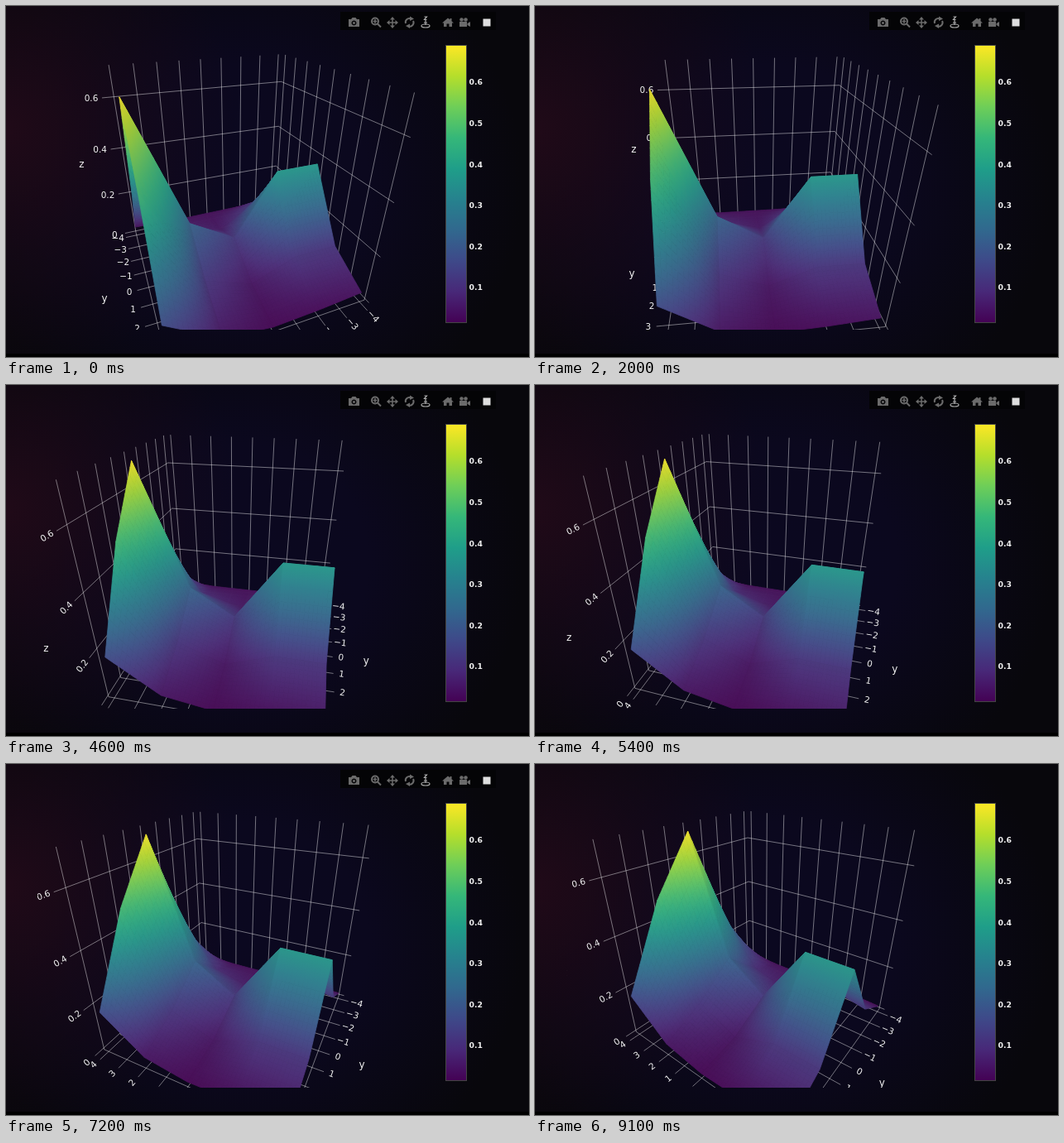
An HTML page with a canvas that plays this animation: 632 px wide and 424 px high, repeating every 9.2 s.

```html
<!DOCTYPE html>
<html lang="en">
<head>
<meta charset="utf-8">
<title>Rotating surface plot</title>
<style>
  html, body { margin: 0; width: 100%; height: 100%; overflow: hidden; background: #08070c; }
  #stage {
    position: relative; width: 632px; height: 424px; overflow: hidden;
    background:
      linear-gradient(#0000 420px, #000 420px),
      radial-gradient(ellipse 280px 300px at 0 150px, #200a18 0, #1c091880 50%, #1c091800 100%),
      radial-gradient(ellipse 340px 320px at 285px 215px, #0b0820 0, #0b081e 45%, #08070c 100%);
  }
  canvas, svg { position: absolute; left: 0; top: 0; }
  #bar { animation: hide 9200ms step-end infinite; }
  @keyframes hide { 0% { opacity: 1 } 94.5% { opacity: 0 } 100% { opacity: 0 } }
  .scale text { font: bold 9.3px "DejaVu Sans", sans-serif; fill: #f0f0f0; }
</style>
</head>
<body>
<div id="stage">
  <canvas id="plot" width="632" height="424"></canvas>
  <svg width="632" height="424">
    <defs><linearGradient id="ramp" x1="0" y1="1" x2="0" y2="0"></linearGradient></defs>
    <g class="scale" id="scale">
      <rect x="531.5" y="47.5" width="25" height="335" fill="url(#ramp)" stroke="#444"/>
    </g>
    <g id="bar" fill="#6b6b6b" stroke="none">
      <rect x="404" y="7" width="188" height="22" fill="#040406"/>
      <path fill-rule="evenodd" d="M414 16h3l1.500-2h4l1.500 2h3v9h-13zM420.500 17.500a3 3 0 1 0 .01 0zM420.500 19a1.500 1.500 0 1 1-.01 0z"/>
      <g fill="none" stroke="#6b6b6b" stroke-width="2">
        <circle cx="446" cy="18.500" r="4"/>
        <path d="M449 21.500l4 4"/>
        <path d="M443.500 18.500h5M446 16v5M467 15v10M462 20h10" stroke-width="1.500"/>
        <path d="M483 21a4.500 4.500 0 0 1 6-5.500M492 18a4.500 4.500 0 0 1-5 6.500"/>
      </g>
      <path d="M467 13l3 3.500h-6zM467 27l3-3.500h-6zM460 20l3.500-3v6zM474 20l-3.500-3v6zM488 12.500l5 3-5 2.500zM488 27l-5-3 5-2.500z"/>
      <g fill="none" stroke="#aaa" stroke-width="1.200">
        <path d="M505.500 13h3l-3 3.500h3M507 17v6M505 20h4"/>
        <ellipse cx="507" cy="24" rx="5" ry="2"/>
      </g>
      <path d="M527 20.500l7-6 2.500 2v-1.500h2v3.300l2.500 2.200h-2v4.500h-3.500v-3.500h-3v3.500H529v-4.500z"/>
      <path d="M548 19h9v6h-9zM557.500 21l3.500-2v6l-3.500-2z"/>
      <circle cx="550.500" cy="16.500" r="2.300"/><circle cx="555.500" cy="16.500" r="2.300"/>
      <rect x="576.500" y="15.500" width="9" height="9" fill="#dedede"/>
    </g>
  </svg>
</div>
<script>
const VIRIDIS = ['440154', '482878', '3e4989', '31688e', '26828e', '1f9e89', '35b779', '6ece58', 'b5de2b', 'fde725']
  .map(h => [0, 2, 4].map(i => parseInt(h.substr(i, 2), 16)));

// Heights on a 5 x 5 grid; rows are y = -4..4, columns x = -4..4
const HEIGHT = [
  [-0.460, -0.450, -0.450, -0.450, -0.440],
  [-0.330, -0.280, -0.420, -0.360, -0.100],
  [0.025, 0.025, -0.320, -0.170, 0.463],
  [-0.336, -0.335, -0.430, -0.330, 0.176],
  [-0.440, -0.460, -0.470, -0.431, -0.254]
];

// Time in ms and turn of the box in degrees
const TURN = [[0, 66.4], [2000, 51.4], [3200, 41.2], [4600, 33.6], [6200, 24.1], [8200, 13.3], [9100, 7.9]];
const LOOP = 9200, STEP = 100;
const CX = 276, CY = 215, FX = 419.5, FY = 425, DIST = 1.69;
const SIN = 0.4738, COS = 0.8806;
const SUB = 12, EDGE = 0.5, UNIT = 0.1175;
const TICKS = [-4, -3, -2, -1, 0, 1, 2, 3, 4];
const ZTICKS = [0, 0.2, 0.4, 0.6];
const ctx = document.getElementById('plot').getContext('2d');
let rc, rs;

const mix = (a, b, k) => a + (b - a) * k;
const zPos = z => (z + 0.008) / 0.72 - 0.5;

function ramp(k) {
  const p = Math.max(0, Math.min(0.9999, k)) * 9, i = Math.floor(p);
  return VIRIDIS[i].map((c, j) => mix(c, VIRIDIS[i + 1][j], p - i));
}

function turnAt(t) {
  let i = 0;
  while (i < TURN.length - 2 && t > TURN[i + 1][0]) i++;
  const [t0, a] = TURN[i], [t1, b] = TURN[i + 1];
  return mix(a, b, Math.min(1, (t - t0) / (t1 - t0)));
}

// Box coordinates to right / away / up as seen by the camera
const turned = (x, y, z) => [x * rc - y * rs, x * rs + y * rc, z];

function project(x, y, z) {
  const [u, v] = turned(x, y, z);
  const d = DIST + v * COS - z * SIN;
  return [CX + FX * u / d, CY - FY * (v * SIN + z * COS) / d, d];
}

function stroke(x0, y0, x1, y1) {
  ctx.beginPath();
  ctx.moveTo(x0, y0);
  ctx.lineTo(x1, y1);
  ctx.stroke();
}

function line(a, b) {
  const p = project(...a), q = project(...b);
  stroke(p[0], p[1], q[0], q[1]);
}

// Text placed beyond an edge, along the outward direction
function label(text, at, out, gap, { size = 10.5, tick = true, spin = false } = {}) {
  const p = project(...at), q = project(at[0] + out[0] * 0.02, at[1] + out[1] * 0.02, at[2]);
  const len = Math.hypot(q[0] - p[0], q[1] - p[1]);
  const dx = (q[0] - p[0]) / len, dy = (q[1] - p[1]) / len;
  if (tick) stroke(p[0], p[1], p[0] + dx * 7, p[1] + dy * 7);
  ctx.save();
  ctx.translate(p[0] + dx * gap, p[1] + dy * gap);
  if (spin) ctx.rotate(Math.atan(dy / dx));
  ctx.font = size + 'px "DejaVu Sans", sans-serif';
  ctx.fillText(text, 0, 0);
  ctx.restore();
}

function drawBox(right) {
  const E = EDGE, side = right ? -E : E;
  ctx.strokeStyle = 'rgba(255,255,255,.58)';
  ctx.lineWidth = 0.75;
  for (const n of TICKS) {
    const p = n * UNIT;
    line([p, -E, -E], [p, -E, E]);
    line([side, p, -E], [side, p, E]);
    line([p, -E, -E], [p, E, -E]);
    line([-E, p, -E], [E, p, -E]);
  }
  for (const n of ZTICKS) {
    const z = zPos(n);
    line([-E, -E, z], [E, -E, z]);
    line([side, -E, z], [side, E, z]);
  }

  ctx.fillStyle = '#f2f2f2';
  ctx.textAlign = 'center';
  ctx.textBaseline = 'middle';
  const zAt = right ? [E, -E] : [E, E], zOut = right ? [1, 0] : [0, 1];
  const yAt = right ? E : -E, yOut = [right ? 1 : -1, 0];
  const spin = !right, title = { size: 12, tick: false };
  for (const n of ZTICKS) label(n ? n.toFixed(1) : '0', [...zAt, zPos(n)], zOut, 20, { spin });
  for (const n of TICKS) {
    const text = String(n).replace('-', '\u2212');
    label(text, [yAt, n * UNIT, -E], yOut, 17, { spin });
    label(text, [n * UNIT, E, -E], [0, 1], 17, { spin: true });
  }
  label('z', [...zAt, 0], zOut, right ? 45 : 63, title);
  label('y', [yAt, 0, -E], yOut, 48, title);
  label('x', [0, E, -E], [0, 1], 50, title);
}

function heightAt(i, j) {
  const c = Math.min(3, Math.floor(i / SUB)), r = Math.min(3, Math.floor(j / SUB));
  const fx = i / SUB - c, fy = j / SUB - r;
  return mix(mix(HEIGHT[r][c], HEIGHT[r][c + 1], fx), mix(HEIGHT[r + 1][c], HEIGHT[r + 1][c + 1], fx), fy);
}

function shade(a, b, c) {
  const [p, q, r] = [a, b, c].map(v => turned(...v));
  const e = q.map((n, i) => n - p[i]), f = r.map((n, i) => n - p[i]);
  const n = [e[1] * f[2] - e[2] * f[1], e[2] * f[0] - e[0] * f[2], e[0] * f[1] - e[1] * f[0]];
  return 0.82 + 0.1 * Math.abs(n[2] * SIN - n[1] * COS) / Math.hypot(...n);
}

// Colour running across one small patch along its steepest height change
function patchFill(pts, ks, light) {
  const color = k => `rgb(${ramp(k).map(v => Math.round(v * light + 13))})`;
  const lo = Math.min(...ks), hi = Math.max(...ks);
  const [p, q, , r] = pts;
  const ax = q[0] - p[0], ay = q[1] - p[1], bx = r[0] - p[0], by = r[1] - p[1];
  const det = ax * by - ay * bx;
  if (Math.abs(det) < 0.5 || hi - lo < 0.002) return color((lo + hi) / 2);
  const ka = ks[1] - ks[0], kb = ks[3] - ks[0];
  const gx = (ka * by - kb * ay) / det, gy = (kb * ax - ka * bx) / det, g2 = gx * gx + gy * gy;
  if (g2 < 1e-9) return color((lo + hi) / 2);
  const s = (lo - ks[0]) / g2, e = (hi - ks[0]) / g2;
  const fill = ctx.createLinearGradient(p[0] + gx * s, p[1] + gy * s, p[0] + gx * e, p[1] + gy * e);
  fill.addColorStop(0, color(lo));
  fill.addColorStop(1, color(hi));
  return fill;
}

const N = SUB * 4, MESH = [];
for (let j = 0; j <= N; j++) {
  MESH.push([]);
  for (let i = 0; i <= N; i++) MESH[j].push([(i / N - 0.5) * 0.94, (j / N - 0.5) * 0.94, heightAt(i, j)]);
}

function drawSurface() {
  const at = MESH.map(row => row.map(p => project(...p)));
  const quads = [];
  for (let j = 0; j < N; j++) for (let i = 0; i < N; i++) {
    const pts = [at[j][i], at[j][i + 1], at[j + 1][i + 1], at[j + 1][i]];
    const mesh = [MESH[j][i], MESH[j][i + 1], MESH[j + 1][i + 1], MESH[j + 1][i]];
    quads.push({ pts, mesh, d: pts.reduce((s, p) => s + p[2], 0) });
  }
  quads.sort((a, b) => b.d - a.d);
  ctx.lineWidth = 0.8;
  ctx.lineJoin = 'round';
  for (const { pts, mesh } of quads) {
    const ks = mesh.map(m => (m[2] + 0.4706) / 0.9412);
    ctx.fillStyle = ctx.strokeStyle = patchFill(pts, ks, shade(mesh[0], mesh[1], mesh[3]));
    ctx.beginPath();
    pts.forEach(p => ctx.lineTo(p[0], p[1]));
    ctx.closePath();
    ctx.fill();
    ctx.stroke();
  }
}

function draw(t) {
  const turn = turnAt(t), a = (turn - 225) * Math.PI / 180;
  rc = Math.cos(a);
  rs = Math.sin(a);
  ctx.clearRect(0, 0, 632, 424);
  ctx.save();
  ctx.beginPath();
  ctx.rect(38, 39, 476, 352);
  ctx.clip();
  drawBox(turn > 45);
  drawSurface();
  ctx.restore();
}

function buildScale() {
  document.getElementById('ramp').innerHTML = VIRIDIS
    .map((c, i) => `<stop offset="${i / 9}" stop-color="rgb(${c})"/>`).join('');
  let rows = '';
  for (let n = 1; n <= 6; n++) rows += `<text x="559.5" y="${(393 - n * 49.6).toFixed(1)}">0.${n}</text>`;
  document.getElementById('scale').insertAdjacentHTML('beforeend', rows);
}

let start = null, shown = -1;
function tick(now) {
  if (start === null) start = now;
  const t = Math.floor(((now - start) % LOOP) / STEP) * STEP;
  if (t !== shown) draw(shown = t);
  requestAnimationFrame(tick);
}

buildScale();
draw(0);
requestAnimationFrame(tick);
</script>
</body>
</html>
```
